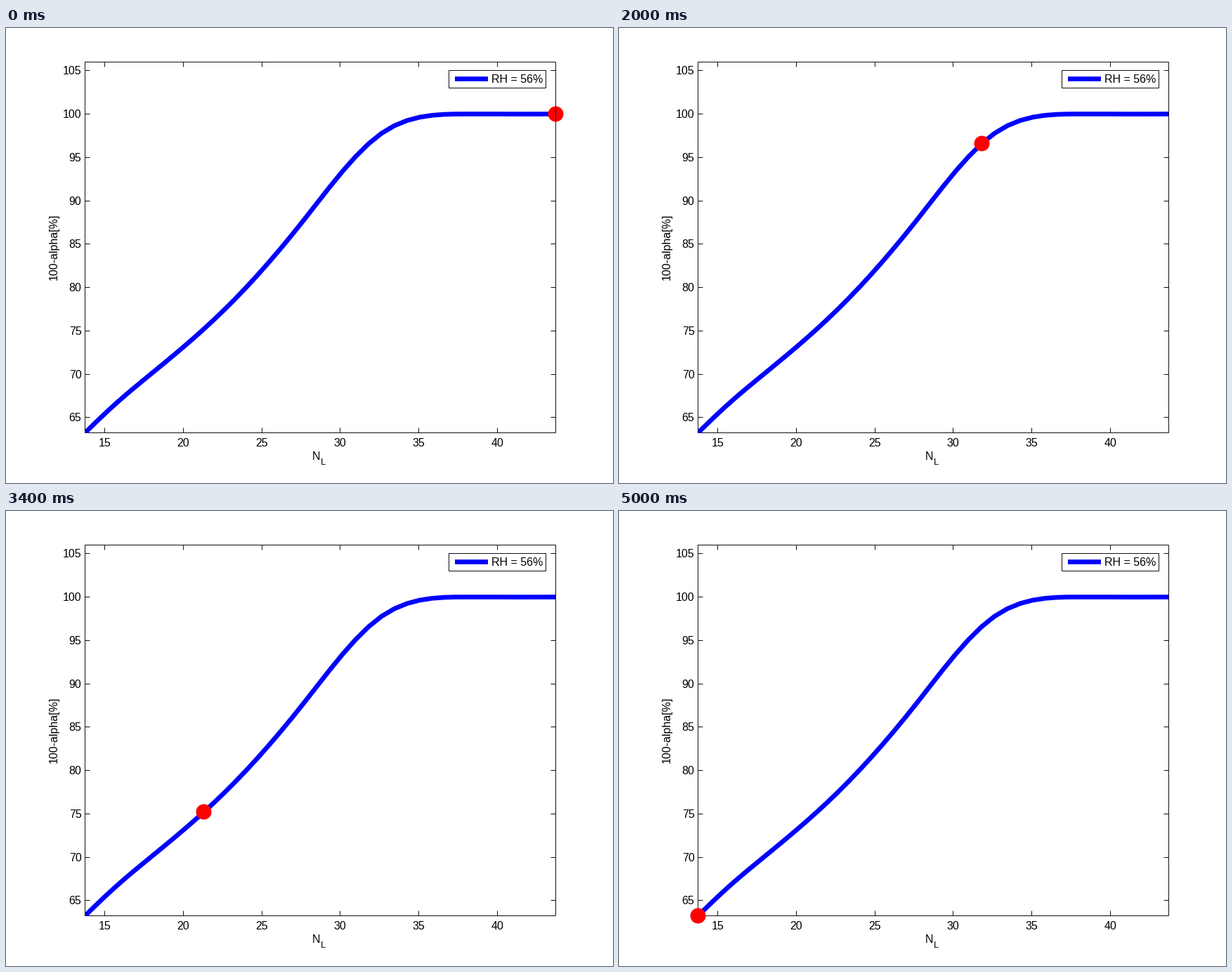
A matplotlib script for the animation above (5200 ms loop, 864x648 px).

```python
import numpy as np
import matplotlib.pyplot as plt
from matplotlib.animation import FuncAnimation
from matplotlib.patches import Circle, Rectangle

WIDTH, HEIGHT, DPI = 864, 648, 72  # at 72 dpi one point is one pixel
LEFT, RIGHT, TOP, BOTTOM = 112.5, 782.5, 48.5, 576.5
FRAMES, INTERVAL, LAST_STOP = 52, 100, 49
INK, BLUE, RED = "#101010", "#0000ff", "#ff0000"
CURVE_WIDTH = 5 * 96 / 72
PLATEAU = 122.5

plt.rcParams["font.family"] = "Liberation Sans"


def spline(x, y, at):
    """Natural cubic spline through the points (x, y)."""
    h, n = np.diff(x), len(x)
    slope = np.diff(y) / h
    system, rhs = np.eye(n), np.zeros(n)
    for i in range(1, n - 1):
        system[i, i - 1:i + 2] = h[i - 1], 2 * (h[i - 1] + h[i]), h[i]
        rhs[i] = 6 * (slope[i] - slope[i - 1])
    bend = np.linalg.solve(system, rhs)
    k = np.clip(np.searchsorted(x, at) - 1, 0, n - 2)
    a, b = x[k + 1] - at, at - x[k]
    return ((bend[k] * a**3 + bend[k + 1] * b**3) / (6 * h[k])
            + (y[k] / h[k] - bend[k] * h[k] / 6) * a
            + (y[k + 1] / h[k] - bend[k + 1] * h[k] / 6) * b)


# Key points of the marker's path: stop number, x, y; the curve joins all stops
KEYS = np.array([(0, RIGHT, PLATEAU), (6, 701.5, PLATEAU), (12, 637.5, 122.6),
                 (15, 589, 127), (18, 534.5, 150), (24, 425.5, 271.5),
                 (30, 326.5, 385.5), (36, 240.5, 464.5), (42, 170.5, 522.5),
                 (LAST_STOP, LEFT, BOTTOM)])
key_stop, key_x, key_y = KEYS.T
stops = np.arange(LAST_STOP + 1)
path_x = spline(key_stop, key_x, stops)
path_y = np.maximum(spline(key_stop, key_y, stops), PLATEAU)

fig = plt.figure(figsize=(WIDTH / DPI, HEIGHT / DPI), dpi=DPI, facecolor="white")
ax = fig.add_axes([0, 0, 1, 1])
ax.set(xlim=(0, WIDTH), ylim=(HEIGHT, 0))
ax.axis("off")


def line(xs, ys, color=INK, width=1, z=1):
    return ax.plot(xs, ys, color=color, lw=width, zorder=z, snap=False,
                   solid_capstyle="butt", solid_joinstyle="round")[0]


def label(x, y, text, ha="center", size=16, **style):
    ax.text(x, y, text, ha=ha, va="baseline", fontsize=size, zorder=6, **style)


def pixel(value):
    """Centre of the pixel that holds the value."""
    return np.floor(value) + 0.5


# Frame and ticks
line([RIGHT, LEFT, LEFT, RIGHT], [TOP, TOP, BOTTOM, BOTTOM])
line([RIGHT, RIGHT], [TOP, BOTTOM], z=5)
for value in range(15, 41, 5):
    x = pixel(140.5 + (value - 15) * 22.36)
    line([x, x], [BOTTOM, BOTTOM - 7])
    line([x, x], [TOP, TOP + 7])
    label(x, 596, str(value))
for value in range(65, 106, 5):
    y = pixel(PLATEAU + (100 - value) * 12.357)
    line([LEFT, LEFT + 7], [y, y])
    line([RIGHT - 7, RIGHT], [y, y])
    label(107.5, y + 5.5, str(value), ha="right")

label(436, 615, "N", ha="left")
label(447.5, 622, "L", ha="left", size=13)
label(73, 312, "100-alpha[%]", rotation=90, rotation_mode="anchor")

# Curve
curve = line(path_x, path_y, BLUE, CURVE_WIDTH, z=2)
curve.set_clip_path(Rectangle((LEFT, TOP), RIGHT - LEFT, BOTTOM - TOP,
                              transform=ax.transData))

# Legend
ax.add_patch(Rectangle((630.5, 60.5), 138, 25, fc="white", ec=INK, lw=1,
                       snap=False, zorder=3))
line([639, 686], [72.5, 72.5], BLUE, CURVE_WIDTH, z=4)
label(691, 78, "RH = 56%", ha="left")

marker = ax.add_patch(Circle((RIGHT, PLATEAU), 11, fc=RED, ec="none", zorder=4))


def update(frame):
    stop = np.clip(frame - 1, 0, LAST_STOP)
    marker.center = pixel(path_x[stop]), pixel(path_y[stop])
    return [marker]


anim = FuncAnimation(fig, update, frames=FRAMES, interval=INTERVAL,
                     repeat=True, repeat_delay=0, blit=False)
plt.show()
```
